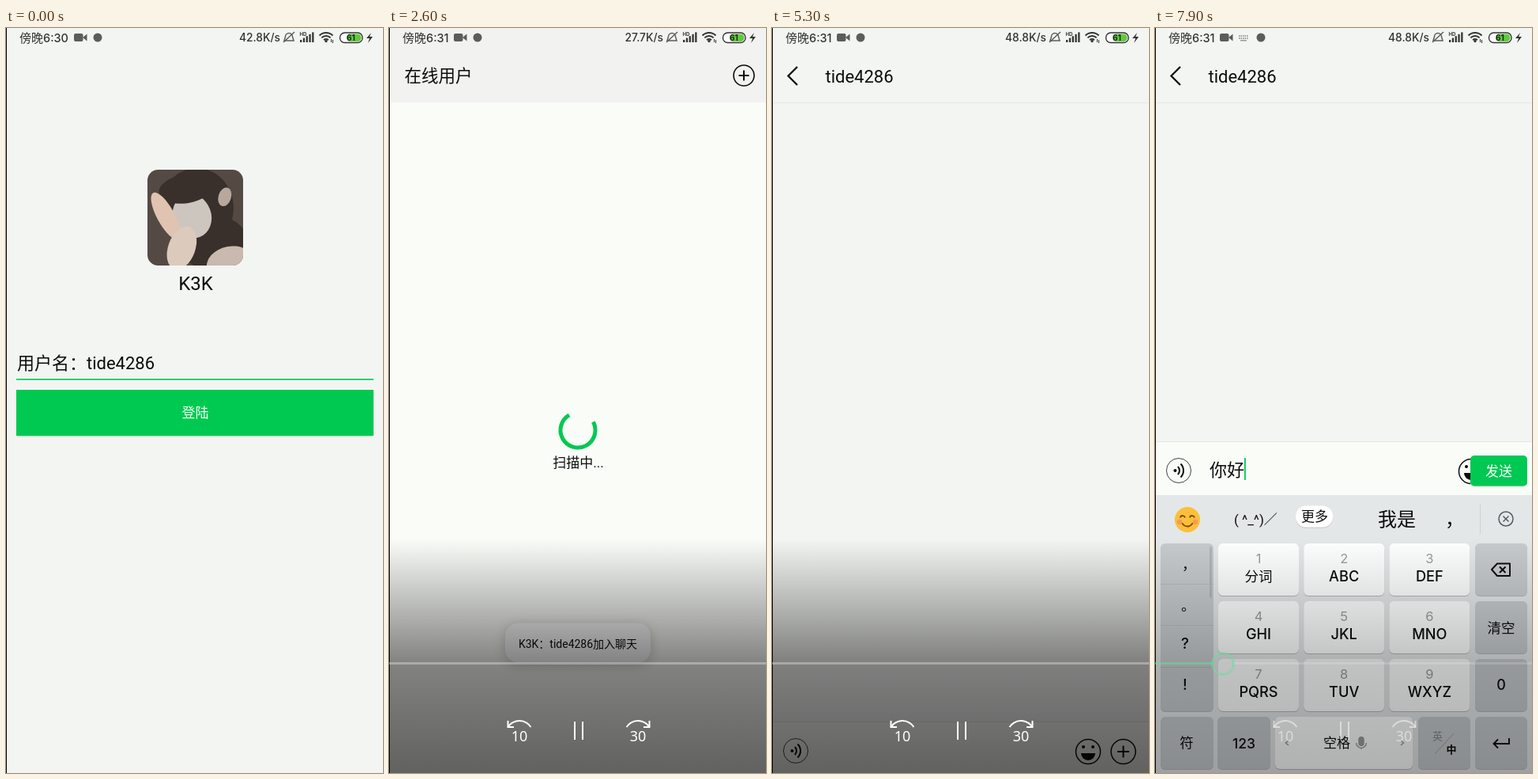
Write an HTML page with a canvas that moves like this. It is 477 px wide and 941 px high and loops after 8 s.

```html
<!DOCTYPE html>
<html lang="zh-CN">
<head>
<meta charset="utf-8">
<title>聊天演示</title>
<style>
html, body { margin: 0; width: 100%; height: 100%; overflow: hidden; background: #f3f5f2; }
canvas { display: block; }
</style>
</head>
<body>
<canvas id="stage" width="477" height="941"></canvas>
<script>
const W = 477, H = 941, LOOP = 8000, STEP = 100;
const c = document.getElementById('stage').getContext('2d');
const FONT = 'Roboto, "Noto Sans CJK SC", "Noto Sans CJK", sans-serif';
const UI = 'Inter, "Noto Sans CJK SC", "Noto Sans CJK", sans-serif';
const GREEN = '#00c853', INK = '#0c0c0c', PAPER = '#fafcf8', PALE = '#f3f5f2';
const USER = 'tide4286', APP = 'K3K';

const clamp = v => Math.min(1, Math.max(0, v));
const ramp = (t, a, b) => clamp((t - a) / (b - a));
const smooth = u => u * u * (3 - 2 * u);
const easeOut = u => 1 - (1 - u) ** 3;

function rect(x, y, w, h, fill) {
  c.fillStyle = fill;
  c.fillRect(x, y, w, h);
}
function round(x, y, w, h, r, fill) {
  c.beginPath();
  c.roundRect(x, y, w, h, r);
  c.fillStyle = fill;
  c.fill();
}
function text(s, x, y, size, { color = INK, align = 'left', font = FONT, weight = 400 } = {}) {
  c.font = `${weight} ${size}px ${font}`;
  c.textAlign = align;
  c.fillStyle = color;
  c.fillText(s, x, y);
}
const mid = (s, x, y, size, opt) => text(s, x, y, size, { align: 'center', ...opt });
function line(pts, color = INK, lw = 2) {
  c.beginPath();
  for (let i = 0; i < pts.length; i += 2) c.lineTo(pts[i], pts[i + 1]);
  c.strokeStyle = color;
  c.lineWidth = lw;
  c.stroke();
}
function arc(x, y, r, a, b, color = INK, lw = 2) {
  c.beginPath();
  c.arc(x, y, r, a * Math.PI / 180, b * Math.PI / 180);
  c.strokeStyle = color;
  c.lineWidth = lw;
  c.stroke();
}
const ring = (x, y, r, color, lw) => arc(x, y, r, 0, 360, color, lw);
function oval(x, y, rx, ry, fill, turn = 0) {
  c.beginPath();
  c.ellipse(x, y, rx, ry, turn, 0, 7);
  c.fillStyle = fill;
  c.fill();
}
const dot = (x, y, r, fill) => oval(x, y, r, r, fill);
function box(x, y, w, h, r, color, lw) {
  c.beginPath();
  c.roundRect(x, y, w, h, r);
  c.strokeStyle = color;
  c.lineWidth = lw;
  c.stroke();
}
function group(alpha, fn) {
  if (alpha <= 0) return;
  c.save();
  c.globalAlpha *= alpha;
  fn();
  c.restore();
}
function shifted(x, y, fn) {
  c.save();
  c.translate(Math.round(x), Math.round(y));
  fn();
  c.restore();
}

function avatar(x, y, size) {
  c.save();
  c.beginPath();
  c.roundRect(x, y, size, size, size * .11);
  c.clip();
  c.translate(x, y);
  c.scale(size / 120, size / 120);
  rect(0, 0, 120, 120, '#544a43');
  oval(62, 48, 46, 50, '#39302c');
  oval(80, 90, 45, 34, '#39302c');
  oval(56, 58, 24, 28, '#cdc6be', -.35);
  oval(48, 24, 34, 18, '#39302c', -.15);
  oval(97, 34, 8, 12, '#b7a79c', .3);
  oval(23, 58, 11, 33, '#e0c3b0', -.5);
  oval(43, 98, 17, 28, '#dccabd', .35);
  oval(104, 118, 30, 22, '#c9b9ae', -.2);
  c.restore();
}

function statusBar(t) {
  const late = t >= 2400, keys = t >= 5800, g = '#5c5c5c', d = '#333';
  text('傍晚', 17, 18, 15, { color: d });
  text(late ? '6:31' : '6:30', 47, 17.5, 14.5, { color: d, font: UI, weight: 500 });
  const x = late ? 82 : 86;
  round(x, 7, 11.5, 10, 2, g);
  c.beginPath();
  c.moveTo(x + 11, 12); c.lineTo(x + 16.5, 7.5); c.lineTo(x + 16.5, 16.5);
  c.fill();
  if (keys) {
    for (let i = 0; i < 10; i++) rect(106 + i % 5 * 2.5, 9 + (i / 5 | 0) * 3, 1.5, 2, '#999');
    rect(108, 15, 8, 1.5, '#999');
  }
  dot(keys ? 134 : late ? 112 : 116, 12, 5.5, g);

  const speed = t < 300 ? '42.8K/s' : t < 4400 ? '27.7K/s' : '48.8K/s';
  text(speed, 347, 17, 13.8, { color: d, align: 'right', font: UI, weight: 500 });
  arc(358, 11, 4.5, 180, 360, g, 1.5);
  line([353.5, 11, 352, 16, 364, 16, 362.5, 11], g, 1.5);
  line([351, 18, 365, 5], g, 1.5);
  mid('HD', 376, 9.5, 6, { color: d, font: UI, weight: 700 });
  for (let i = 0; i < 5; i++) rect(372 + i * 3.8, 15 - i * 2.4, 2.3, 3 + i * 2.4, d);
  for (const r of [4, 8, 12]) arc(405, 18, r, 225, 315, d, 2);
  dot(405, 16.5, 1.7, d);
  rect(411, 14, 1, 4, d); rect(413, 15, 1, 4, d);
  round(422, 6, 29, 12.5, 6, '#fff');
  round(431, 7.5, 18.5, 9.5, 4.5, '#62c93f');
  box(422.5, 6, 28.5, 12.5, 6, d, 1.4);
  mid('61', 436.5, 16, 10, { color: '#222', font: UI, weight: 700 });
  c.beginPath();
  for (const [px, py] of [[462, 6], [456, 13], [460, 13], [458, 19], [464, 11], [460, 11]]) c.lineTo(px, py);
  c.fillStyle = d;
  c.fill();
}

function loginPage(t) {
  rect(0, 0, W, H, PALE);
  avatar(179, 179, 121);
  mid(APP, 240, 331, 24);
  text('用户名：' + USER, 14, 431, 22);
  rect(13, 443, 452, 1.6, GREEN);
  rect(14, 515, 450, 1.5, '#d4d9d4');
  rect(13, 457, 452, 58, '#00c951');
  group(.16 * (1 - ramp(t, 300, 440)), () => {
    const w = 452 * easeOut(ramp(t, 60, 300));
    rect(239 - w / 2, 457, w, 58, '#000');
  });
  mid('登陆', 239.5, 492, 17, { color: '#f4fff8' });
}

function spinner(t) {
  const s = (t - 570) / 1000, u = s / 1.333, f = u - Math.floor(u);
  const head = smooth(clamp(2 * f)), tail = smooth(clamp(2 * f - 1));
  const a = -73 + 65.5 * s + 270 * (Math.floor(u) + tail);
  arc(239, 508, 22, a, a + 10 + 260 * (head - tail), GREEN, 5);
  mid('扫描中...', 239.5, 555, 17);
}

function listPage(t) {
  rect(1, 0, W, 94, '#f2f3f1');
  rect(1, 94, W, H, PAPER);
  text('在线用户', 19.5, 68, 21.5);
  ring(449, 60, 13, INK, 1.6);
  line([442.5, 60, 455.5, 60], INK, 2);
  line([449, 53.5, 449, 66.5], INK, 2);
  if (t < 3300) spinner(t);
  group(ramp(t, 3200, 3500), () => {
    if (t >= 3900 && t < 4100) rect(1, 94, W, 85, '#eff1ee');
    rect(1, 179, W, 1, '#eff0ee');
    avatar(19, 106, 61);
    text(USER + ' - 自己', 92.5, 145, 22);
  });
}

function face(x, y) {
  ring(x, y, 15.5, INK, 1.5);
  dot(x - 6, y - 6, 2, INK);
  dot(x + 6, y - 6, 2, INK);
  c.beginPath();
  c.arc(x, y + 2, 9, 0, Math.PI);
  c.fillStyle = INK;
  c.fill();
}

function inputBar(t) {
  rect(1, 522, W, 70, PAPER);
  rect(1, 522, W, 1, '#e4e6e3');
  ring(30, 559, 15.5, '#444', 1);
  dot(25.5, 559, 2, INK);
  arc(24, 559, 7, -45, 45, INK, 2);
  arc(24, 559, 12, -45, 45, INK, 2);
  face(400, 560);
  ring(444.5, 560, 15.5, INK, 1.5);
  line([437, 560, 452, 560]);
  line([444.5, 552.5, 444.5, 567.5]);
  const sent = t >= 7420;
  if (sent) {
    text('你好', 69, 566, 22);
    round(399, 541, 72, 38.5, 5, '#d5dcd6');
    round(399, 540, 72, 38.5, 5, GREEN);
    mid('发送', 435, 565.5, 17, { color: '#fff' });
  }
  if (t > 5700 && Math.floor((t - 6600) / 500) % 2 === 0) rect(sent ? 113 : 69, 543, 1.8, 28, GREEN);
}

function mic(x, y, k, color, lw) {
  box(x - 3.5 * k, y - 9 * k, 7 * k, 13 * k, 3.5 * k, color, lw);
  arc(x, y, 8 * k, 0, 180, color, lw);
  line([x, y + 8 * k, x, y + 10 * k], color, lw);
}

function toolbar() {
  const g = '#4d5154', lw = 1.7;
  for (const x of [25.5, 35]) for (const y of [612.5, 622]) box(x, y, 6.5, 6.5, 1, g, lw);
  for (let i = 0; i < 15; i++) rect(83 + i % 5 * 4, 613 + (i / 5 | 0) * 4.2, 2.8, 2.8, g);
  rect(83, 626, 19, 2, g);
  ring(150, 619, 7.5, g, lw);
  line([155.5, 625, 160, 630], g, lw);
  ring(210.5, 620.5, 9.5, g, lw);
  dot(207, 618, 1.3, g); dot(214, 618, 1.3, g);
  arc(210.5, 621, 5, 15, 165, g, lw);
  line([264, 615, 260, 620.5, 264, 626], g, lw);
  line([275, 615, 279, 620.5, 275, 626], g, lw);
  line([269.5, 612, 269.5, 629], g, lw);
  mic(329, 620, 1, g, lw);
  box(379.5, 613, 18, 16, 2, g, lw);
  mid('MV', 388.5, 625, 9.5, { color: g, font: UI, weight: 700 });
  dot(402, 609.5, 2.3, '#e5533d');
  line([436, 616, 445, 624.5, 454, 616], g, lw);
}

function predictions() {
  dot(41, 621, 16, '#fbbf3a');
  arc(35, 619, 3, 190, 350, '#7a4a13', 1.8);
  arc(47, 619, 3, 190, 350, '#7a4a13', 1.8);
  arc(41, 622, 7.5, 25, 155, '#7a4a13', 1.8);
  dot(31, 624, 3.2, '#f59a58'); dot(51, 624, 3.2, '#f59a58');
  text('( ^_^)／', 100, 627, 17);
  round(178, 605, 47, 27, 13, '#cfd3d5');
  round(178, 603.5, 47, 27, 13, '#fff');
  mid('更多', 202, 623, 17);
  text('我是', 282, 629, 24);
  text('，', 367, 629, 24);
  rect(411, 602, 1, 37, '#cdd1d3');
  ring(444, 620, 9, '#565a5d', 1.5);
  line([440.5, 616.5, 447.5, 623.5], '#565a5d', 1.5);
  line([447.5, 616.5, 440.5, 623.5], '#565a5d', 1.5);
}

const TAPS = [5, 3, 3, 1, 5], FIRST = 6600, GAP = 140;
const PINYIN = ['n', 'ni', "ni'h", "ni'ha", "ni'hao"];
function candidates(n) {
  round(1, 566, 24 + 9 * PINYIN[n - 1].length, 24, [0, 6, 0, 0], '#e3e7e8');
  text(PINYIN[n - 1], 12, 583, 15);
  const list = n < 3 ? ['你', '呢', '哦', '米'] : ['你好', '你', '你和', '拟'];
  list.forEach((s, i) => text(s, 22 + i * 92, 629, 23));
  line([436, 616, 445, 624.5, 454, 616], '#565a5d', 1.6);
}

function key(x, y, w, h, fill) {
  round(x, y + 1, w, h, 6, '#b4b8bb');
  round(x, y, w, h, 6, fill);
}
const label = (s, x, y, size) => mid(s, x, y, size, { font: UI, weight: 500 });

function keyboard(t) {
  const gray = '#c6cacd', white = '#fdfefe', soft = '#999d9f';
  const n = Math.floor((t - FIRST) / GAP);
  rect(1, 590, W, H - 580, '#e3e7e8');
  if (t >= 7420) predictions();
  else if (n >= 0) candidates(Math.min(n + 1, 5));
  else toolbar();

  key(7, 651, 67, 212, gray);
  for (const y of [702, 754, 807]) rect(7, y, 67, 1, '#b7bbbe');
  round(69, 655, 3, 65, 1.5, '#b0b4b7');
  text('，', 34, 684, 18); text('。', 33, 736, 18);
  label('?', 38, 784, 19); label('!', 38, 836, 19);

  ['分词', 'ABC', 'DEF', 'GHI', 'JKL', 'MNO', 'PQRS', 'TUV', 'WXYZ'].forEach((s, i) => {
    const x = 80 + i % 3 * 108.2, y = 651 + (i / 3 | 0) * 73;
    const held = n >= 0 && TAPS[n] === i && (t - FIRST) % GAP < 100;
    key(x, y, 102, 66, held ? '#d3d6d8' : white);
    mid(i + 1, x + 51, y + 24.5, 16.5, { color: soft, font: UI });
    label(s, x + 51, y + 47.5, i ? 18.2 : 17.5);
  });

  for (let i = 0; i < 4; i++) key(405, 651 + i * 73, 66, 66, gray);
  c.lineJoin = 'round';
  line([426, 684, 433, 676.5, 449, 676.5, 449, 692, 433, 692, 426, 684, 433, 676.5], INK, 1.9);
  line([436, 680.5, 443.5, 688], INK, 1.9);
  line([443.5, 680.5, 436, 688], INK, 1.9);
  c.lineJoin = 'miter';
  label('清空', 438, 764, 17.5);
  label('0', 438, 836, 18);
  line([448, 897, 448, 904, 429, 904], INK, 1.9);
  line([434, 898.5, 428.5, 904, 434, 909.5], INK, 1.9);

  key(7, 870, 67, 66, gray);
  key(79, 870, 67, 66, gray);
  key(152, 870, 174, 66, white);
  key(333, 870, 66, 66, gray);
  label('符', 40, 909, 17.5);
  label('123', 112.5, 909.5, 17.5);
  text('空格', 213, 909, 17);
  round(257.5, 895, 7, 12, 3.5, soft);
  mic(261, 903, .8, soft, 1.4);
  line([169, 900, 165.5, 903, 169, 906], soft, 1.5);
  line([311, 900, 314.5, 903, 311, 906], soft, 1.5);
  mid('英', 357.5, 899, 13, { color: '#85898c' });
  line([354, 917, 378, 891], '#9a9ea1', 1);
  mid('中', 375, 915.5, 13, { weight: 700 });
}

function chatPage(t) {
  rect(1, 0, W, H, PALE);
  rect(1, 94, W, 1, '#e5e7e4');
  line([32, 49, 20.5, 60.5, 32, 72], INK, 2.3);
  text(USER, 67.5, 69, 22);
  const down = 354 * (1 - easeOut(ramp(t, 5680, 6050)));
  shifted(0, down, () => {
    inputBar(t);
    if (t > 5680) keyboard(t);
  });
}

// The new page slides in while the old one trails at a quarter of the speed.
function slide(t, start, under, over) {
  const p = easeOut(ramp(t, start, start + 500));
  if (p < 1) shifted(-.25 * p * W, 0, () => under(t));
  if (p > 0) {
    rect(0, 0, W, H, `rgba(0,0,0,${p / 2})`);
    shifted((1 - p) * (W - 1), 0, () => over(t));
  }
}

function toast(s, w, size, alpha) {
  group(alpha, () => {
    c.shadowColor = 'rgba(0,0,0,.2)';
    c.shadowBlur = 16;
    c.shadowOffsetY = 3;
    round(239 - w / 2, 751.5, w, 50, 16, '#f9faf9');
    c.shadowColor = 'transparent';
    mid(s, 239, 782.5, size);
  });
}

function skip(x, dir, s) {
  shifted(x, 0, () => {
    mid(s, 0, 901, 18, { color: '#fff', font: '"Noto Sans", sans-serif' });
    c.scale(dir, 1);
    arc(0, 892, 17, 212, 328, '#fff', 2);
    line([-14.5, 875, -14.5, 883, -7, 883], '#fff', 2);
  });
}

function player(t) {
  group(ramp(t, 720, 1320) * (1 - ramp(t, 7600, 8200)), () => {
    const g = c.createLinearGradient(0, 645, 0, H);
    for (const [at, a] of [[0, 0], [.53, .48], [1, .61]]) g.addColorStop(at, `rgba(0,0,0,${a})`);
    rect(0, 645, W, H - 645, g);
    const x = Math.max(4, 19 + (t - 6200) * .0394), on = t >= 5500;
    const from = on ? x + 13 : 0;
    rect(from, 801, W - from, 3, 'rgba(255,255,255,.32)');
    if (on) {
      rect(0, 801, Math.max(0, x - 13), 3, '#62dfa2');
      ring(x, 803, 13.5, '#62dfa2', 3);
    }
    skip(165, 1, '10');
    skip(315, -1, '30');
    rect(234, 876, 2, 23, '#fff');
    rect(244, 876, 2, 23, '#fff');
  });
}

function draw() {
  const t = Math.floor((performance.now() % LOOP + 2) / STEP) * STEP % LOOP;
  if (t < 3000) slide(t, 681, loginPage, listPage);
  else slide(t, 4825, listPage, chatPage);
  statusBar(t);
  toast(`${APP}：${USER}加入聊天`, 184, 14, ramp(t, 2350, 2600) * (1 - ramp(t, 2950, 3200)));
  toast('连接成功', 92, 14.5, ramp(t, 4350, 4600) * (1 - ramp(t, 5050, 5300)));
  rect(0, 0, 1, H, '#000');
  player(t);
  requestAnimationFrame(draw);
}
draw();
</script>
</body>
</html>
```
